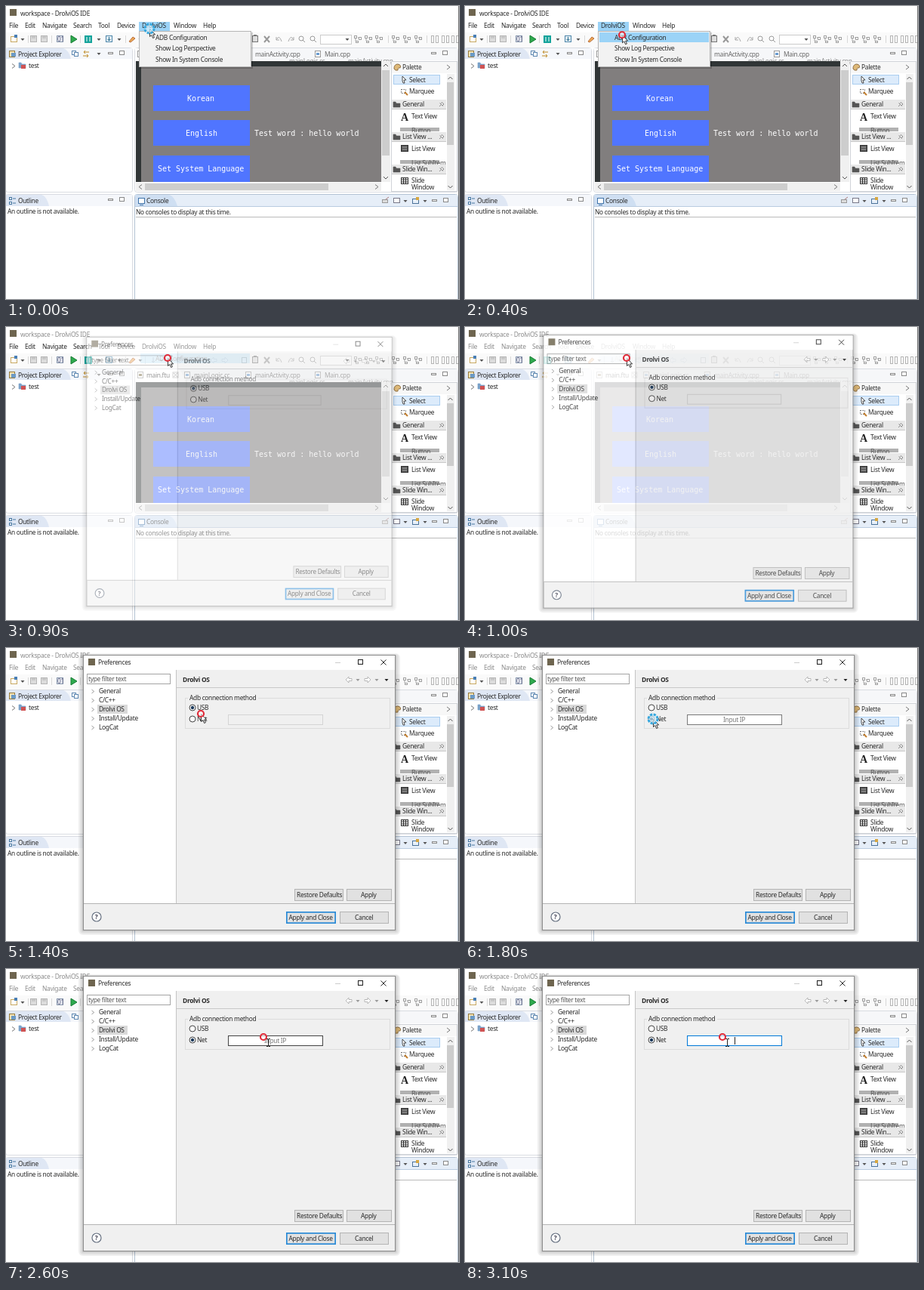
Recreate the animation shown at these times as an HTML page. Size 600 by 388 pixels, loop 3200 ms.

```html
<!DOCTYPE html>
<html lang="en">
<head>
<meta charset="utf-8">
<title>Preferences demo</title>
<style>
html, body { margin: 0; width: 100%; height: 100%; overflow: hidden; background: #fff; }
svg { display: block; width: 100%; height: 100%; }
text { font: 8.4px "Noto Sans", "Open Sans", sans-serif; letter-spacing: -.3px; white-space: pre; }
.mono { font: 10px "DejaVu Sans Mono", monospace; letter-spacing: 0; }
.bold { font-weight: 700; }
.serif { font: 700 14px "Liberation Serif", serif; }
</style>
</head>
<body>
<svg id="stage" viewBox="0 0 600 388" preserveAspectRatio="none"></svg>
<script>
const LOOP = 3200, STEP = 100;
const BLUE = '#0078d7', INK = '#2a2a2a', INACTIVE = '#8c8c8c';

// Drawing helpers, all returning SVG markup
const text = (x, y, s, fill = INK, cls = '') =>
  `<text x="${x}" y="${y}" fill="${fill}" class="${cls}">${s}</text>`;
const rect = (x, y, w, h, fill, extra = '') =>
  `<rect x="${x}" y="${y}" width="${w}" height="${h}" fill="${fill}" ${extra}/>`;
const box = (x, y, w, h, fill, stroke, extra = '') =>
  rect(x + .5, y + .5, w - 1, h - 1, fill, `stroke="${stroke}" ${extra}`);
const path = (d, stroke = '#555', fill = 'none', width = 1) =>
  `<path d="${d}" stroke="${stroke}" fill="${fill}" stroke-width="${width}"/>`;
const circle = (x, y, r, fill, stroke, width = 1) =>
  `<circle cx="${x}" cy="${y}" r="${r}" fill="${fill}" stroke="${stroke}" stroke-width="${width}"/>`;
const hline = (x, y, w, color) => rect(x, y, w, 1, color);
const vline = (x, y, h, color) => rect(x, y, 1, h, color);
const group = (id, content) => `<g id="${id}">${content}</g>`;
const chevron = (x, y, dx = 2, dy = 3, color = '#777') =>
  path(`M${x - dx} ${y - dy}l${dx * 2} ${dy}l${-dx * 2} ${dy}`, color);
const vChevron = (x, y, dir) => path(`M${x - 3} ${y}l3 ${3 * dir}l3 ${-3 * dir}`, '#555');
const dropdown = (x, y, color = '#555') => path(`M${x - 2.5} ${y - 1}h5l-2.5 3z`, 'none', color);
const minMax = (x, y) => box(x - 3, y, 7, 3, '#fff', '#888') + box(x + 12, y - 2, 7, 6, '#fff', '#888');
const folder = (x, y, color = '#555') => path(`M${x} ${y}h3l1 2h5v5h-9z`, color, color, .6);
const fileIcon = (x, y, color) => box(x, y, 8, 9, '#fff', '#999') + rect(x + 2, y + 3, 4, 3, color);
const appIcon = (x, y) => rect(x, y, 9, 9, '#6e654f');
const arrow = (x, y, dir, color = '#aaa') =>
  path(`M${x - 4 * dir} ${y - 1.5}h${4 * dir}v-2.5l${4 * dir} 4l${-4 * dir} 4v-2.5h${-4 * dir}z`, color, '#fff', .8);
const button = (x, y, w, h, label, textX, border = '#b4b4b4', width = 1) =>
  rect(x + width / 2, y + width / 2, w - width, h - width, '#e1e1e1', `stroke="${border}" stroke-width="${width}"`) +
  text(textX, y + h / 2 + 3, label);

function toolbar() {
  let s = rect(0, 35, 600, 20, '#fafafa');
  s += box(6, 40, 9, 8, '#fff', '#c8a860') + rect(11, 38, 4, 4, '#4a7fb5') + dropdown(22, 44);
  for (const x of [36, 50]) s += box(x - 4, 39, 9, 9, '#dcdcdc', '#b4b4b4') + rect(x - 2, 40, 5, 3, '#c8c8c8');
  for (const x of [29, 60, 98, 158, 184]) s += vline(x, 39, 10, '#d8d8d8');
  s += box(67, 39, 9, 9, '#eef2f8', '#8595ac') + text(68, 47, '01', '#557');
  s += path('M86 39l8 5l-8 5z', '#157a32', '#2faa4e');
  s += rect(104, 39, 10, 10, '#14a39b') + path('M107 41v6M111 41v6', '#fff') + dropdown(123, 44);
  s += box(132, 39, 9, 9, '#e8f3f8', '#4b83a8') + path('M136.5 41v5l-2-2m2 2l2-2', '#226688') + dropdown(150, 44);
  s += path('M163 47l5-6l3 2l-6 5z', '#b96c3b', '#edaa55') + dropdown(178, 44);
  s += path('M195 40v7m-2-2l2 2l2-2', '#aaa') + dropdown(206, 44, '#aaa');
  for (const x of [215, 245, 275]) s += arrow(x, 44, -1, '#b9c3cd') + arrow(x + 15, 44, 1, '#b9c3cd');
  s += box(312, 40, 7, 8, '#fff', '#999') + box(326, 39, 8, 9, '#ddd', '#777') + rect(328, 38, 4, 2, '#777');
  s += path('M342 40l7 8m0-8l-7 8', '#999', 'none', 2);
  s += path('M358 45q4-8 7 2m-7-6v4h4M381 45q-4-8-7 2m7-6v4h-4', '#aaa');
  for (const x of [392, 407]) s += circle(x - 1, 43, 3, '#fff', '#999') + path(`M${x + 1} 45l3 3`, '#999');
  s += box(416, 38, 42, 13, '#fff', '#ccc') + dropdown(452, 44);
  for (const x of [466, 480, 494, 516, 531, 546])
    s += box(x - 5, 39, 4, 4, '#fff', '#a0a0a0') + box(x + 1, 41, 4, 4, '#fff', '#a0a0a0') +
         box(x - 3, 46, 4, 3, '#fff', '#a0a0a0') + path(`M${x - 3} 43v3M${x} 42h2`, '#a0a0a0');
  for (const x of [568, 582, 595]) s += box(x - 5, 39, 4, 10, '#fff', '#b4b4b4') + box(x + 1, 39, 4, 10, '#fff', '#b4b4b4');
  for (const x of [506, 557]) s += vline(x, 39, 10, '#d8d8d8');
  return s;
}

function sideViews() {
  let s = box(-1, 55, 169, 192, '#fff', '#d9dce2', 'rx="3"') + rect(0, 56, 167, 14, '#f5f7fb');
  s += path('M0 56H76q7 2 10 14H0z', 'none', '#dfe7f4');
  s += box(4, 59, 8, 9, '#f4e3b4', '#967b3d') + rect(7, 62, 6, 5, '#6b9ac6') + text(16, 67, 'Project Explorer');
  s += box(87, 59, 6, 6, '#fff', '#5c86b0') + box(90, 61, 6, 6, '#fff', '#5c86b0');
  s += path('M110 61h-7l2-2m-2 2l2 2M102 66h7l-2-2m2 2l-2 2', '#bf8a25') + dropdown(123, 63) + minMax(138, 61);
  s += chevron(10, 79.5) + folder(17, 75, '#7ba2c9') + rect(20, 78, 6, 5, '#d05353') + text(30, 82, 'test');

  s += box(-1, 249, 169, 145, '#fff', '#d9dce2', 'rx="3"') + rect(0, 250, 167, 15, '#f5f7fb');
  s += path('M0 250H47q7 2 10 15H0z', 'none', '#dfe7f4');
  s += box(4, 253, 4, 4, '#fff', '#4676a0') + box(4, 259, 4, 4, '#fff', '#4676a0') + path('M9 255h4M9 261h4', '#4676a0');
  return s + text(16, 261, 'Outline') + minMax(138, 255) + text(2, 275, 'An outline is not available.');
}

function editor() {
  let s = box(170, 55, 429, 192, '#fff', '#d9dce2', 'rx="3"') + rect(171, 56, 427, 16, '#f6f7f9');
  s += path('M171 56H228q6 2 9 16H171z', 'none', '#fff');
  s += fileIcon(174, 59, '#7a6b44') + text(186, 67, 'main.ftu') + path('M222 61l5 5m0-5l-5 5', '#888') +
       box(220.5, 59.5, 8, 8, 'none', '#aaa');
  for (const [x, label] of [[236, 'mainLogic.cc'], [317, 'mainActivity.cpp'], [409, 'Main.cpp']])
    s += fileIcon(x, 59, '#6a9bd0') + text(x + 13, 67, label, '#666');
  s += text(375, 76, 'mainLogic.cc', '#888') + text(453, 76, 'mainActivity.cpp', '#888') + minMax(566, 61);
  s += rect(172, 73, 325, 160, '#303536') + rect(179, 80, 318, 153, '#817e7e');
  for (const [y, h, x, label] of [[105, 34, 240, 'Korean'], [151, 34, 238, 'English'], [198, 35, 201, 'Set System Language']])
    s += rect(195, y, 128, h, '#5075ff') + text(x, y + 20.5, label, '#fff', 'mono');
  s += text(329, 172, 'Test word : hello world', '#fff', 'mono');
  s += rect(497, 73, 12, 160, '#f0f0f0') + rect(498, 85, 10, 113, '#cdcdcd') + vChevron(503, 80, -1) + vChevron(503, 226, 1);
  s += rect(172, 234, 325, 11, '#f0f0f0') + rect(184, 235, 243, 9, '#cdcdcd') + chevron(178, 239.5, -2) + chevron(491, 239.5);
  return s;
}

function palette() {
  const pin = y => path(`M574 ${y + 9}l2.5-2.5m-2-2l4 4m-3-3l2-2l2.5 2.5l-2 2`, '#777', 'none', .8);
  const header = (y, label) => rect(511, y, 72, 12, '#e8e8e8') + hline(511, y + 12, 72, '#c8c8c8') + folder(513, y + 3) +
    text(525, y + 8.5, label) + pin(y);
  const clipped = (y, label) => rect(522, y, 52, 5, '#b1b1b1') + text(537, y + 6.5, label, '#555');
  let s = box(510, 73, 88, 173, '#fff', '#d0d3d8') + rect(511, 74, 86, 15, '#f7f7f7');
  s += path('M514 83q0-6 5-6q5 1 3 5q-3-1-3 3q-4 1-5-2z', '#8f6e40', '#dfba79') + text(525, 84, 'Palette') + chevron(586, 81);
  s += box(513, 91, 62, 13, '#dcebfb', '#a9cdf0') + path('M525 93l5 5h-3l1 4l-2 0l-1-3z', '#222', '#fff', .8) + text(534, 101, 'Select');
  s += box(523, 110, 7, 6, 'none', '#666', 'stroke-dasharray="1.5 1.5"') + path('M528 114l4 4', '#c27d2c', 'none', 2) + text(534, 116, 'Marquee');
  s += clipped(161, 'Button') + clipped(204, 'List SubItem') + rect(511, 167, 72, 5, '#fff');
  s += header(124, 'General') + text(523, 152, 'A', '#222', 'serif') + text(537, 149, 'Text View');
  s += header(167, 'List View ...') + box(523, 184, 10, 9, '#555', '#333') + path('M525 187h6m-6 3h6', '#aaa') + text(537, 192, 'List View');
  s += header(210, 'Slide Win...') + box(523, 227, 10, 9, '#fff', '#333') + path('M526.5 227v9m3-9v9M523 230h10m-10 3h10', '#333');
  s += text(537, 234, 'Slide') + text(537, 243, 'Window');
  return s + rect(584, 90, 10, 154, '#f0f0f0') + rect(584, 101, 9, 83, '#cdcdcd') + vChevron(588.5, 97, -1) + vChevron(588.5, 238, 1);
}

function consoleView() {
  let s = box(170, 249, 429, 145, '#fff', '#b4c3d4', 'rx="3"') + rect(171, 250, 427, 15, '#e6eef8');
  s += path('M171 250H216q7 2 11 15H171z', 'none', '#cfdff2') + hline(171, 265, 427, '#b9cbe0');
  s += box(175, 254, 9, 8, '#fff', '#3e72a8') + hline(177, 263, 5, '#3e72a8') + text(186, 261, 'Console');
  s += box(498, 256, 8, 5, '#ddd', '#999') + path('M503 256l4-3', '#a77') + box(513, 254, 9, 7, '#fff', '#778') + dropdown(529, 258);
  s += box(538, 255, 9, 7, '#e7f0fa', '#4b7299') + rect(543, 253, 4, 4, '#d7a741') + dropdown(555, 258) + minMax(567, 256);
  return s + text(172, 276, 'No consoles to display at this time.') + hline(172, 279, 425, '#bbb');
}

const menuTitles = [[4, 'File'], [25, 'Edit'], [48, 'Navigate'], [89, 'Search'], [122, 'Tool'],
  [147, 'Device'], [180, 'DrolviOS'], [222, 'Window'], [261, 'Help']];

const workspace = () => rect(0, 0, 600, 388, '#fff') + appIcon(5, 4) +
  group('caption', text(19, 13, 'workspace - DrolviOS IDE', 'inherit')) +
  rect(176, 21, 41, 12, '#9bd3f7', 'id="menuHot"') +
  group('menuBar', menuTitles.map(([x, label]) => text(x, 29, label, 'inherit')).join('')) +
  toolbar() + sideViews() + editor() + palette() + consoleView() + vline(599, 0, 388, '#777');

const menu = () => group('menu', rect(178, 35, 149, 48, '#000', 'opacity=".18"') + box(176, 33, 149, 48, '#f2f2f2', '#b5b5b5') +
    text(198, 59, 'Show Log Perspective') + text(198, 74, 'Show In System Console')) +
  group('firstItem', rect(178, 35, 145, 13, '#9bd3f7', 'id="itemHot"') + text(198, 45, 'ADB Configuration'));

function dialog() {
  let s = [6, 4, 2, 1].map(g => rect(102 - g, 10 - g / 2, 414 + 2 * g, 364 + 1.5 * g, '#000', `opacity=".06" rx="${g}"`)).join('');
  s += box(102, 9, 414, 365, '#f0f0f0', '#8c8c8c') + rect(103, 10, 412, 19, '#fff');
  s += appIcon(109, 14) + text(122, 22, 'Preferences');
  s += hline(436, 19, 7, '#ccc') + box(466, 15, 7, 7, '#fff', '#222') + path('M496.5 15.5l7 7m0-7l-7 7', '#222');
  s += rect(103, 29, 122, 309, '#fff') + vline(225, 29, 309, '#c4c4c4') + hline(226, 52, 289, '#c8c8c8') + hline(103, 338, 412, '#b4b4b4');
  s += box(107, 34, 111, 14, '#fff', '#a4a4a4') + text(109, 44, 'type filter text', '#555') + rect(121, 75, 40, 12, '#d9d9d9');
  ['General', 'C/C++', 'Drolvi OS', 'Install/Update', 'LogCat'].forEach((label, i) =>
    s += chevron(115, 57.5 + 12 * i, 1.5, 2.5, '#999') + text(123, 60 + 12 * i, label));
  s += text(234, 45, 'Drolvi OS', INK, 'bold') + arrow(454, 42, -1) + dropdown(466, 42, '#999') +
       arrow(479, 42, 1) + dropdown(491, 42, '#999') + dropdown(504, 42, '#222');
  s += box(237, 66, 272, 41, 'none', '#dcdcdc') + rect(241, 62, 93, 9, '#f0f0f0') + text(243, 69, 'Adb connection method');
  for (const [y, id, label] of [[79, 'usbDot', 'USB'], [94, 'netDot', 'Net']])
    s += circle(247, y, 4, '#fff', '#444') + `<circle id="${id}" cx="247" cy="${y}" r="2.2" fill="#1c3a5c"/>` + text(253, y + 3, label);
  s += box(294, 88, 126, 14, '#f0f0f0', '#ccc', 'id="field"') + group('hint', text(342, 98, 'Input IP', '#777')) +
       rect(357, 90, 1, 10, '#222', 'id="caret"');
  s += button(382, 319, 65, 16, 'Restore Defaults', 385) + button(451, 319, 60, 16, 'Apply', 470);
  s += circle(120, 356, 6, '#fff', '#667080', 1.2) + text(117.8, 359.2, '?', '#445', 'bold');
  s += button(371, 349, 66, 16, 'Apply and Close', 374.5, '#2a8ad6', 1.7) + button(442, 349, 65, 16, 'Cancel', 462);
  return group('dialog', s);
}

const pointer = () => group('pointer',
  group('arrowCursor', path('M.5 .5v10l2.3-2l1.8 4l1.8-.8l-1.8-3.8h3z', '#222', '#fff', .9)) +
  group('beamCursor', path('M4 2.5h2l.5.5l.5-.5H9M6.5 3v9M4 12.5h2l.5-.5l.5.5H9', '#222')) +
  group('ring', circle(0, 0, 4, '#fff9', '#e02c3a', 2.2)) +
  group('splash', '<circle r="6" fill="#d6effc" fill-opacity=".7" stroke="#36a7de" stroke-width="3" stroke-dasharray="3.2 1.5"/>'));

document.getElementById('stage').innerHTML = workspace() + menu() + dialog() + pointer();

const el = {};
document.querySelectorAll('[id]').forEach(node => el[node.id] = node);
const show = (name, visible) => el[name].setAttribute('opacity', +visible);

// time, x, y of the pointer hot spot
const route = [[0, 190, 30], [100, 190, 30], [500, 214, 41], [1200, 214, 41], [1400, 258, 87],
  [1600, 249, 94], [1900, 249, 94], [2200, 331, 89], [2600, 341, 90], [LOOP, 341, 90]];

function pointerAt(t) {
  const i = route.findIndex(point => point[0] > t);
  const [t0, x0, y0] = route[i - 1], [t1, x1, y1] = route[i];
  const u = (t - t0) / (t1 - t0);
  return [x0 + (x1 - x0) * u, y0 + (y1 - y0) * u];
}

function render(t) {
  const within = (from, to) => t >= from && t < to;
  const [x, y] = pointerAt(t);
  const net = t >= 1800, overField = net && x > 292, focused = t >= 2800;

  el.caption.setAttribute('fill', t < 800 ? INK : INACTIVE);
  el.menuBar.setAttribute('fill', t < 1000 ? INK : INACTIVE);
  show('menuHot', t < 800);
  show('menu', t < 800);
  show('firstItem', t < 800 ? 1 : Math.max(0, .7 - (t - 800) / 400));
  show('itemHot', y > 35);

  const left = 1 - Math.min(1, Math.max(0, (t - 800) / 400));
  const fade = Math.pow(left, 2.6);
  show('dialog', 1 - fade);
  el.dialog.setAttribute('transform', `translate(309 191.5) scale(${1 - .045 * fade}) translate(-309 -191.5)`);

  show('usbDot', !net);
  show('netDot', net);
  el.field.setAttribute('fill', net ? '#fff' : '#f0f0f0');
  el.field.setAttribute('stroke', focused ? BLUE : overField ? '#444' : net ? '#7a7a7a' : '#d4d4d4');
  show('hint', net && t < 3100);
  show('caret', t >= 3100);

  const clicking = t < 100 || within(700, 900) || within(1700, 1900) || within(2700, 2900);
  el.pointer.setAttribute('transform', `translate(${x} ${y})`);
  show('splash', clicking);
  show('ring', !clicking);
  show('arrowCursor', !overField);
  show('beamCursor', overField);
}

const start = performance.now();
function frame() {
  const t = (performance.now() - start) % LOOP;
  render(Math.floor(t / STEP) * STEP);
  requestAnimationFrame(frame);
}
render(0);
requestAnimationFrame(frame);
</script>
</body>
</html>
```
